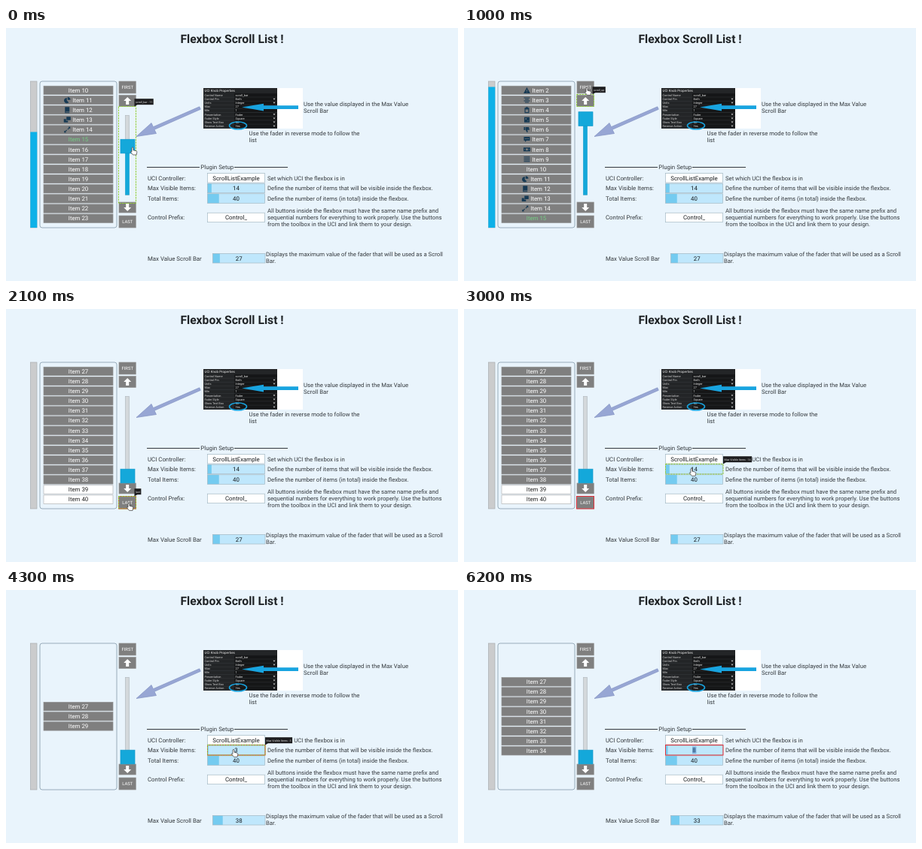
An HTML page with a canvas that plays this animation: 600 px wide and 337 px high, repeating every 6.3 s.

```html
<!DOCTYPE html>
<html lang="en">
<head>
<meta charset="utf-8">
<title>Flexbox Scroll List</title>
<style>
html, body { margin: 0; width: 100%; height: 100%; overflow: hidden; background: #e9f4fc; }
canvas { display: block; width: 600px; height: 337px; }
</style>
</head>
<body>
<canvas id="stage"></canvas>
<script>
const canvas = document.getElementById('stage');
const ctx = canvas.getContext('2d');
const dpr = window.devicePixelRatio || 1;
canvas.width = 600 * dpr;
canvas.height = 337 * dpr;
ctx.textRendering = 'geometricPrecision';

const LOOP = 6300, STEP = 100, TOTAL = 40;
const INK = '#33383c', GRAY = '#7f7f7f', BLUE = '#14a8da', SIZE = 7.85, HINT_SIZE = 7.72;

// Hoverable controls: x, y, width, height
const zones = {
  first: [149.5, 70.5, 23, 17],
  scroll_up: [149.5, 88.5, 23, 16],
  scroll_bar: [149.5, 104.5, 23, 129],
  scroll_down: [149.5, 231.5, 23, 15.5],
  last: [149.5, 249.5, 23, 16.5],
  'UCI Controller': [267.5, 193, 76.5, 13.5],
  'Max Visible Items': [267.5, 206.5, 76.5, 13.5]
};

// Keyframes: time, value(s)
const faderKeys = [[0, 11], [100, 11], [400, 5], [500, 4], [600, 3], [800, 3]];
const cursorKeys = [
  [700, 168, 127], [900, 163, 98], [1000, 163, 79], [1100, 163, 79], [1300, 163, 242], [1700, 163, 242],
  [1900, 163, 258], [2200, 163, 258], [2900, 302, 212], [5100, 302, 212],
  [5200, 300, 199], [5300, 296, 169], [5600, 290, -20]
];

// Icons on an 8 x 8 grid, by item number
const icons = {
  1: 'M1 0h6v8h-6zM4 1.3a1.2 1.2 0 1 0 .01 0zM2.2 6.5q1.8-3 3.6 0z',
  2: 'M4 0l4.4 8h-8.8zM3.6 3h.8v2.4h-.8zM3.6 6h.8v.9h-.8z',
  3: 'M0 .5h8v1h-8zM1.5 2.5h5v1h-5zM0 4.5h8v1h-8zM1.5 6.5h5v1h-5z',
  4: 'M1 1h6v7h-6zM2.2 3.2h3.6v3.6h-3.6zM2.7 0h2.6v1h-2.6z',
  5: 'M.5 .5h7v7h-7zM2 2h1.5v1.5h-1.5zM5 5h1v1h-1z',
  6: 'M0 .5h1.8v4h-1.8zM2.3 .5h4.2l1 3.8h-2.7l.4 3.2h-1.2l-1.7-3.2z',
  7: 'M0 .5h8v5h-4.5l-2 2v-2h-1.5zM1.6 2.5h1v1h-1zM3.5 2.5h1v1h-1zM5.4 2.5h1v1h-1z',
  8: 'M-.5 1.5h9v5h-9zM4 2.5a1.5 1.5 0 1 0 .01 0zM.5 3.5h1v1h-1zM6.5 3.5h1v1h-1z',
  9: 'M0 .5h8v1h-8zM0 2.5h8v1h-8zM0 4.5h8v1h-8zM0 6.5h8v1h-8z',
  11: 'M3.5 .8v3.7l2.6 2.6a3.7 3.7 0 1 1-2.6-6.3zM4.5 0a3.7 3.7 0 0 1 3.7 3.7h-3.7z',
  12: 'M1 0h6v8h-6zM2 6.3h5v.7h-5z',
  13: 'M3 0h5.5v4.5h-5.5zM-.5 3h3v2.2h2.5v2.3h-5.5z',
  14: 'M8 0v3l-1-1-2 2-.8-.8 2-2-1-1zM0 8v-3l1 1 2-2 .8.8-2 2 1 1z'
};

const clamp = (v, lo, hi) => Math.max(lo, Math.min(hi, v));

function tween(keys, t) {
  let i = 0;
  while (i < keys.length - 2 && t >= keys[i + 1][0]) i++;
  const [a, b] = [keys[i], keys[i + 1]];
  const k = clamp((t - a[0]) / (b[0] - a[0]), 0, 1);
  return a.slice(1).map((v, n) => v + (b[n + 1] - v) * k);
}

function faderAt(t) {
  if (t < 0) return 10;
  if (t >= 2000) return 27;
  if (t >= 1500) return t < 1700 ? 2 : 3;
  if (t >= 1100) return 1;
  return t >= 900 ? 2 : Math.round(tween(faderKeys, t)[0]);
}

const faderY = value => 117 + (value - 1) * 105.5 / 26;

function cursorAt(t) {
  return t < 700 ? [168, faderY(faderAt(Math.max(t, 0))) + 1] : tween(cursorKeys, t);
}

function visibleAt(t) {
  return t < 4350 ? clamp(14 - (t - 3100) / STEP, 3, 14) : clamp(3 + (t - 4300) / STEP, 3, 8);
}

function focusAt(t) {
  if (t < 1100) return null;
  if (t < 1500) return 'first';
  if (t < 2000) return 'scroll_down';
  return t < 3100 ? 'last' : 'Max Visible Items';
}

function zoneAt([px, py]) {
  return Object.keys(zones).find(name => {
    const [x, y, w, h] = zones[name];
    return px >= x && px <= x + w && py >= y && py < y + h;
  });
}

function rect(x, y, w, h, fill, stroke) {
  if (fill) { ctx.fillStyle = fill; ctx.fillRect(x, y, w, h); }
  if (stroke) {
    ctx.strokeStyle = stroke;
    ctx.lineWidth = 0.7;
    ctx.strokeRect(x, y, w, h);
  }
}

function text(str, x, y, { size = SIZE, color = INK, align = 'left', weight = 400 } = {}) {
  ctx.font = `${weight} ${size}px Roboto, sans-serif`;
  ctx.textAlign = align;
  ctx.fillStyle = color;
  ctx.fillText(str, x, y);
}

function hint(x, y, ...rows) {
  rows.forEach((row, i) => text(row, x, y + i * 9, { size: HINT_SIZE }));
}

function shape(d, fill, stroke, x = 0, y = 0, width = 0.7) {
  const path = new Path2D(d);
  ctx.save();
  ctx.translate(x, y);
  if (fill) { ctx.fillStyle = fill; ctx.fill(path, 'evenodd'); }
  if (stroke) { ctx.strokeStyle = stroke; ctx.lineWidth = width; ctx.stroke(path); }
  ctx.restore();
}

function outline(name, color, dash) {
  ctx.strokeStyle = color;
  ctx.lineWidth = 1;
  ctx.setLineDash(dash);
  ctx.strokeRect(...zones[name]);
  ctx.setLineDash([]);
}

function field(x, y, w, value, isNumber) {
  rect(x, y, w, 12.5, isNumber ? '#bfe7fc' : '#fff');
  if (isNumber) rect(x, y, w * value / 200, 12.5, '#74cbf0');
  rect(x, y, w, 12.5, null, '#a3b8c4');
  text(value, x + w / 2, y + 9.2, { align: 'center', color: '#15191c' });
}

function drawPropertyPanel() {
  const rows = [
    ['Control Name', 'scroll_bar'], ['Control Pin', 'Both'], ['Units', 'Integer'],
    ['Max', '27'], ['Min', '1'], ['Presentation', 'Fader'], ['Fader Style', 'Square'],
    ['Show Text Box', 'No'], ['Reverse Action', 'Yes']
  ];
  rect(262, 80, 132, 54, '#fff');
  rect(262, 80, 98, 54, '#232527');
  text('UCI Knob Properties', 263.5, 85, { size: 4.5, color: '#eee' });
  rows.forEach(([label, value], i) => {
    const y = 87.2 + i * 5.15;
    rect(303, y, 56.5, 4.5, '#151617');
    rect(262, y + 4.7, 98, 0.4, '#3c3f42');
    text(label, 263.5, y + 3.6, { size: 3.9, color: '#d0d0d0' });
    text(value, 304.5, y + 3.6, { size: 3.9, color: '#e4e4e4' });
    if (i === 1 || i === 2 || i > 4) shape('M0 0h3l-1.5 2z', '#ccc', null, 354.5, y + 1.3);
  });
  shape('M313 105.5L342 100.7V103.2H388V108H342V110.5z', '#18a4e0');
  shape('M296.5 130a11.5 5 0 1 0 23 0a11.5 5 0 1 0-23 0z', null, '#18a4e0', 0, 0, 1.6);
  shape('M173 144.5L193 126.5L195.4 131.7L256.8 104.8L258.3 108.3L197 135.3L199.5 140.5z', '#97a6d4', '#8392c2');
}

function drawForm(visible, selected) {
  rect(187, 185, 70, 1, INK);
  rect(303, 185, 71, 1, INK);
  text('Plugin Setup', 280.3, 188, { align: 'center' });

  text('UCI Controller:', 188, 202.8);
  text('Max Visible Items:', 188, 216);
  text('Total Items:', 188, 229.8);
  text('Control Prefix:', 188, 255.3);
  text('Max Value Scroll Bar', 188, 309.8);

  field(267.5, 193.5, 76, 'ScrollListExample');
  field(267.5, 207.2, 76, visible, true);
  if (selected) {
    rect(303, 208.5, 5.4, 9.5, '#7fb0dc');
    text(visible, 305.5, 216.4, { align: 'center', color: '#1c3c5c' });
  }
  field(267.5, 220.8, 76, TOTAL, true);
  field(267.5, 246.2, 76, 'Control_');
  field(274.5, 300.5, 69.5, TOTAL + 1 - visible, true);

  hint(347, 202.8, 'Set which UCI the flexbox is in');
  hint(347, 216, 'Define the number of items that will be visible inside the flexbox.');
  hint(347, 229.8, 'Define the number of items (in total) inside the flexbox.');
  hint(347, 246.2, 'All buttons inside the flexbox must have the same name prefix and',
    'sequential numbers for everything to work properly. Use the buttons',
    'from the toolbox in the UCI and link them to your design.');
  hint(345, 303.8, 'Displays the maximum value of the fader that will be used as a Scroll', 'Bar.');
  hint(395, 103.8, 'Use the value displayed in the Max Value', 'Scroll Bar');
  hint(322.5, 143.4, 'Use the fader in reverse mode to follow the', 'list');
}

function drawItem(number, y) {
  const plain = number > 38;
  const color = plain ? '#222' : number === 15 ? '#74cf85' : '#fff';
  const label = 'Item ' + number;
  rect(50, y - 5.7, 92, 11.4, plain ? '#fff' : GRAY, plain ? '#b5b5b5' : '#8f8f8f');
  if (!icons[number]) return text(label, 96, y + 2.8, { align: 'center', color });
  ctx.font = `400 ${SIZE}px Roboto, sans-serif`;
  const left = 96 - (ctx.measureText(label).width + 11) / 2;
  shape(icons[number], '#173a54', null, left, y - 4);
  text(label, left + 11, y + 2.8, { color });
}

function drawList(first, visible) {
  const level = 71 + (first - 1) / 26 * 195;
  rect(32.5, 71, 8.5, 195, '#cbcccd', '#a9adb0');
  rect(32.3, level, 9, 266 - level, '#0db1e8');

  ctx.beginPath();
  ctx.roundRect(45, 71, 102, 195, 3);
  ctx.strokeStyle = '#8fa3b3';
  ctx.lineWidth = 0.9;
  ctx.stroke();
  for (let i = 0; i < visible; i++) {
    drawItem(first + i, 168.3 + (i - (visible - 1) / 2) * 13.13);
  }
}

function drawScroller(value) {
  for (const [y, h, label] of [[71, 16, 'FIRST'], [89.5, 15, ''], [232, 14, ''], [250, 16, 'LAST']]) {
    rect(150, y, 22.3, h, GRAY, '#969696');
    text(label, 161.2, y + 10.2, { size: 5.9, color: '#fff', align: 'center' });
  }
  shape('M0-5l5 5h-3v5h-4v-5h-3z', '#fff', null, 161.2, 97);
  shape('M0 5l5-5h-3v-5h-4v5h-3z', '#fff', null, 161.2, 239);

  const y = faderY(value);
  rect(158.5, 116.5, 5, 106, '#d3d8db', '#b3babf');
  rect(158.2, y, 5.6, 222.5 - y, BLUE);
  rect(152, y - 9.3, 19, 18.6, BLUE, '#1099cb');
}

function drawTooltip(name, label) {
  const [zx, zy, zw] = zones[name];
  const x = name.includes(' ') ? zx + zw : zx + zw - 2;
  const y = zy - 10.3;
  ctx.font = '400 3.6px Roboto, sans-serif';
  rect(x, y, ctx.measureText(label).width + 3, 8, '#1d1d1f');
  shape('M0 0h4l-4 2.5z', '#1d1d1f', null, x, y + 7.8);
  text(label, x + 1.5, y + 5.3, { size: 3.6, color: '#e6e6e6' });
}

function drawCursor([x, y], isHand) {
  if (isHand) {
    shape('M-1 1q1-1.6 2 0v3.2l4 1q1 .3 .8 1.6l-.7 3.6h-4.6l-3.2-4q0-1.2 1.7-.2z', '#fff', '#333', x, y);
  } else {
    shape('M0 0v7l1.7-1.5 1.2 2.6 1.2-.5-1.2-2.5h2.2z', '#fff', '#444', x, y);
  }
}

function draw(t) {
  const value = faderAt(t);
  const visible = visibleAt(t);
  const cursor = cursorAt(t);
  const hover = zoneAt(cursorAt(t - STEP));
  const focus = focusAt(t);

  ctx.setTransform(dpr, 0, 0, dpr, 0, 0);
  rect(0, 0, 600, 337, '#e9f4fc');
  text('Flexbox Scroll List !', 300, 19.5, { size: 15.7, weight: 700, align: 'center', color: '#1f2326' });
  drawPropertyPanel();
  drawForm(visible, t >= 5100);
  drawList(faderAt(t - STEP), visible);
  drawScroller(value);

  if (focus) outline(focus, '#e0303a', focus === 'first' ? [3, 1] : []);
  if (hover) {
    outline(hover, '#93cf3c', [2.5, 1]);
    const shown = { scroll_bar: value, 'Max Visible Items': visible }[hover];
    drawTooltip(hover, shown === undefined ? hover : `${hover} : ${shown}`);
  }
  drawCursor(cursor, zoneAt(cursor));
}

function tick() {
  draw(Math.floor(performance.now() % LOOP / STEP) * STEP);
  requestAnimationFrame(tick);
}
tick();
</script>
</body>
</html>
```
